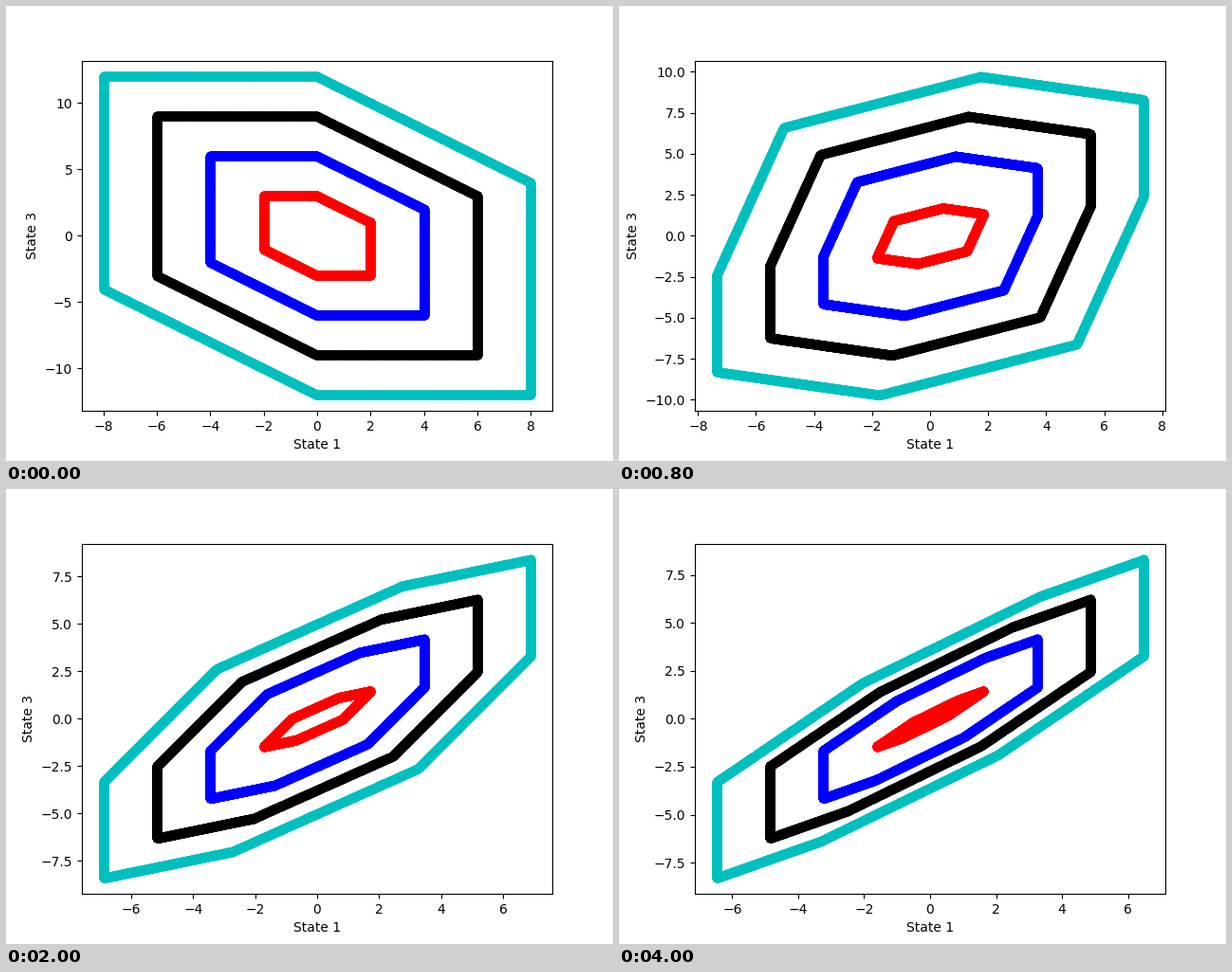
A matplotlib script for the animation above (4.2 s loop, 640 by 480 pixels).

```python
import numpy as np
import matplotlib.pyplot as plt
from matplotlib.animation import FuncAnimation

STEPS = 21
INTERVAL = 200
POINTS_PER_EDGE = 400
BLOAT = 0.4315  # vertical widening of the outer sets, relative to their height
FAST, MEDIUM, SLOW = 0.775, 0.96, 0.995  # decay of the modes per step
LEVELS = [(1, "r"), (2, "b"), (3, "k"), (4, "c")]
START_GENERATORS = np.array([[1, 0], [0, 2], [1, -1]])


def transition(step):
    """Map from the initial states 1 and 3 to the states after some steps."""
    fast, medium, slow = FAST ** step, MEDIUM ** step, SLOW ** step
    return np.array([
        [0.5437 + 0.2877 * medium + 0.1686 * fast,
         0.3495 - 0.1603 * medium - 0.1892 * fast],
        [0.627 * (slow - fast), 0.32 + 0.68 * fast],
    ])


def boundary(generators):
    """Dense points along the outline of a zonotope centred at the origin."""
    order = np.argsort(np.arctan2(generators[:, 1], generators[:, 0]))
    edges = 2 * generators[order]
    chain = np.vstack([[0, 0], np.cumsum(edges, axis=0)]) - edges.sum(axis=0) / 2
    t = np.linspace(0, 1, POINTS_PER_EDGE)[:, None]
    half = np.vstack([p + t * (q - p) for p, q in zip(chain[:-1], chain[1:])])
    return np.vstack([half, -half])


fig, ax = plt.subplots(figsize=(6.4, 4.8), dpi=100)


def draw(step):
    ax.clear()
    generators = START_GENERATORS @ transition(step).T
    extra = [0, BLOAT * np.abs(generators[:, 1]).sum()]
    for level, color in LEVELS:
        bloated = level > 1 and step > 0
        shape = np.vstack([generators, extra]) if bloated else generators
        x, y = level * boundary(shape).T
        ax.plot(x, y, "o", color=color)
    ax.set_xlabel("State 1")
    ax.set_ylabel("State 3")


anim = FuncAnimation(fig, draw, frames=STEPS, interval=INTERVAL,
                     repeat=True, repeat_delay=0)
plt.show()
```
